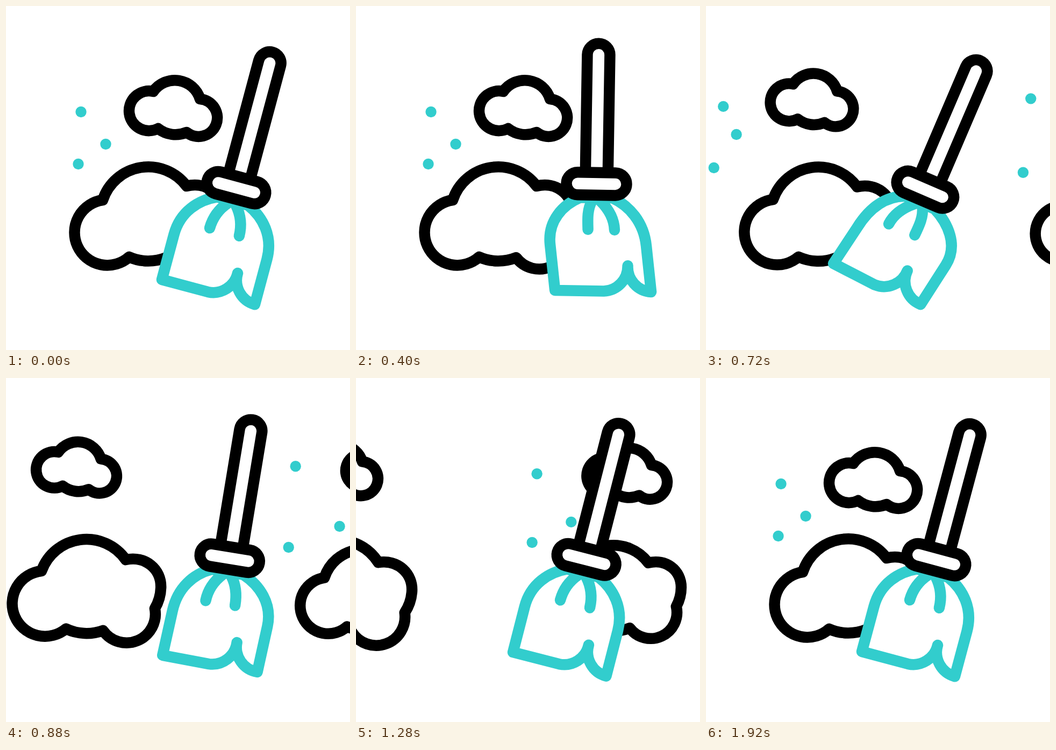
An HTML page that plays this animation: 640x640 px, repeating every 2 s.

```html
<!DOCTYPE html>
<html lang="en">
<head>
<meta charset="utf-8">
<title>Sweeping broom</title>
<style>
  html, body { margin: 0; width: 100%; height: 100%; overflow: hidden; background: #fff; }
  svg { display: block; width: 100vw; height: 100vh; }
  path, rect { fill: #fff; stroke: #000; stroke-width: 20.5; stroke-linecap: round; stroke-linejoin: round; vector-effect: non-scaling-stroke; }
  .teal path { stroke: #32cdcd; }
  circle { fill: #32cdcd; }
  .line { fill: none; }
</style>
</head>
<body>
<svg viewBox="0 0 640 640">
  <defs>
    <path id="big" d="M180 361A89 89 0 0 1 336 335C372 326 403 350 403 385C403 400 399 413 393 424A53.5 53.5 0 0 1 298 468A89 89 0 0 1 229 467A61 61 0 1 1 180 361Z"/>
    <path id="small" d="M274 159A49 49 0 0 1 361 173A35 35 0 1 1 336 235A52 52 0 0 1 283 228A37 37 0 1 1 274 159Z"/>
  </defs>
  <use id="bigOut" href="#big"/>
  <use id="bigIn" href="#big"/>
  <use id="smallOut" href="#small"/>
  <use id="smallIn" href="#small"/>
  <g id="dots"></g>
  <g id="broom">
    <g class="teal">
      <path id="skirt"/>
      <path id="folds" class="line"/>
    </g>
    <path d="M-21 0V-240A21 21 0 0 1 21-240V0"/>
    <rect x="-56" y="-21" width="112" height="42" rx="21"/>
  </g>
</svg>
<script>
const $ = id => document.getElementById(id);
const LOOP = 2000, STEP = 40, END = 1920;

// Position, then how far each dot follows the leaving and arriving drift
const dots = [
  { x: 139.5, y: 197, out: [.94, -.65], in: [1, -1] },
  { x: 185.5, y: 257, out: [1.13, -1.16], in: [1.09, .58] },
  { x: 134.5, y: 294, out: [1.05, .45], in: [.98, .64] }
];

// Smoothstep from 0 to 1 between times a and b
function ease(t, a, b) {
  const u = Math.min(1, Math.max(0, (t - a) / (b - a)));
  return u * u * (3 - 2 * u);
}

function place(el, transform) {
  el.setAttribute('transform', transform);
}

function scaled(cx, cy, dx, dy, s) {
  return `translate(${cx + dx} ${cy + dy}) scale(${s}) translate(${-cx} ${-cy})`;
}

function drawBristles(b) {
  const size = Math.abs(b), up = .1 * size, foot = 201 - up;
  const side = .13 * b + .19 * size, hip = 1.5 * side - .5 * b;
  const notch = `${43.6 + 1.1 * b} ${153 - up}`;
  $('skirt').setAttribute('d',
    `M-30 26C-62 40 ${-89.5 + hip} 70 ${-89.5 + side} 114L${-89.5 + b} ${foot + .45 * Math.min(b, 0)}`
    + `L${-1 + 1.15 * b} ${foot}A46.5 46.5 0 0 0 ${notch}`
    + `A46.5 46.5 0 0 0 ${89.5 + b} ${foot}L${89.5 + side} 114C${89.5 + hip} 70 62 40 30 26Z`);
  const fold = (dir, d) =>
    `M${28.4 * dir + d} 85.3C${28 * dir + .9 * d} 65 ${22 * dir + .4 * d} 48 ${8 * dir} 32`;
  $('folds').setAttribute('d', fold(-1, .78 * b + .12 * size) + fold(1, .7 * b - .28 * size));
}

function drawBroom(t) {
  const pull = ease(t, 80, 420), push = ease(t, 420, 718);
  const angle = 15 - 14.2 * pull + 22.4 * push - 22.4 * ease(t, 715, 1000) + 14.2 * ease(t, 1000, 1320);
  const slide = 15.6 * pull - 33.3 * push + 17.7 * ease(t, 720, 1250);
  const bend = 15.6 * pull - 29.1 * push + 13.5 * ease(t, 720, 980);
  place($('broom'), `translate(${401 + slide} 320) rotate(${angle}) translate(31.2 10.3)`);
  drawBristles(bend);
}

const circles = dots.map(() => [0, 1].map(() => {
  const c = document.createElementNS('http://www.w3.org/2000/svg', 'circle');
  c.setAttribute('r', 10.2);
  return $('dots').appendChild(c);
}));

function drawLeaving(t) {
  const dx = .412 * Math.max(0, t - 443);
  const dy = 25 * ease(t, 400, 950) - 6 * ease(t, 900, 1280);
  const bigX = 477 * ease(t, 400, 1900), tilt = bigX / 62;
  place($('bigOut'), `translate(${-bigX} ${tilt * .4}) rotate(${tilt} 265 400)`);
  place($('smallOut'), scaled(311, 190.5, -dx, -dy, 1 - .09 * ease(t, 400, 940)));
  dots.forEach((d, i) =>
    place(circles[i][0], `translate(${d.x - d.out[0] * dx} ${d.y + d.out[1] * dy})`));
}

function drawArriving(t) {
  const dx = 529 * (1 - ease(t, 389, 1910));
  const dy = 35 * ease(t, 400, 900) * (1 - ease(t, 700, END));
  const bigX = 595 * Math.sin(Math.max(0, END - t) / 1172) ** 1.56;
  const scale = .855 + .145 * ease(t, 800, END);
  // Newcomers stay off stage until the old ones leave
  $('bigIn').style.visibility = $('smallIn').style.visibility = t > 400 ? 'visible' : 'hidden';
  place($('bigIn'), scaled(265, 436, bigX, 0, scale));
  place($('smallIn'), scaled(311, 190.5, .98 * dx, -.67 * dy, scale));
  dots.forEach((d, i) =>
    place(circles[i][1], `translate(${d.x + d.in[0] * dx} ${d.y + d.in[1] * dy})`));
}

const start = performance.now();
function frame() {
  const elapsed = (performance.now() - start) % LOOP;
  const t = Math.floor(elapsed / STEP) * STEP;
  drawBroom(t);
  drawLeaving(t);
  drawArriving(t);
  requestAnimationFrame(frame);
}
frame();
</script>
</body>
</html>
```
